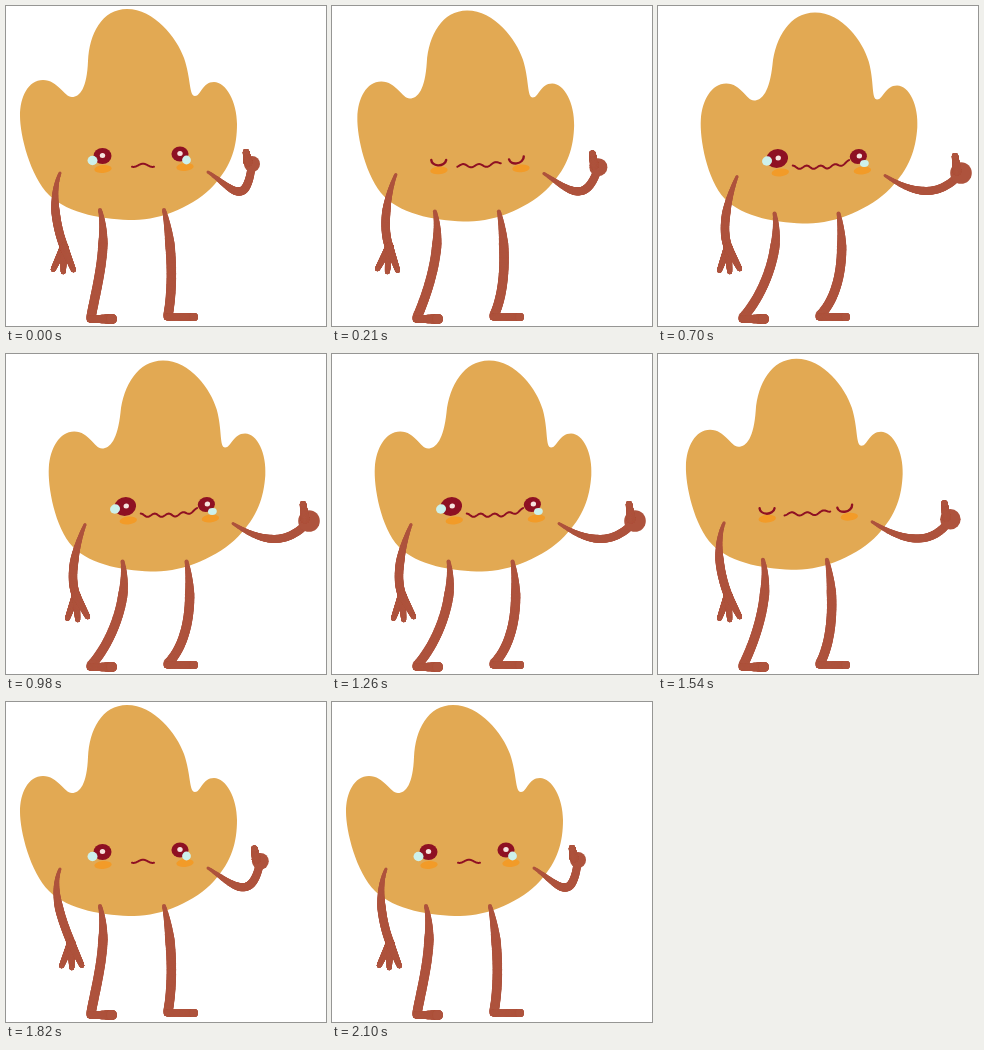
An HTML page with a canvas for the animation above (2170 ms loop, 320 px wide and 320 px high).

```html
<!DOCTYPE html>
<html lang="en">
<head>
<meta charset="utf-8">
<title>Thumbs up</title>
<style>
html, body { margin: 0; width: 100%; height: 100%; overflow: hidden; background: #fff; }
canvas { display: block; width: 100vmin; height: 100vmin; }
</style>
</head>
<body>
<canvas id="stage" width="320" height="320"></canvas>
<script>
const ctx = document.getElementById('stage').getContext('2d');
const LOOP = 2170, STEP = 70;
const SKIN = '#e2a953', LIMB = '#ae533d', RED = '#8e1023', TEAR = '#cdf1ec', BLUSH = '#f29b28';

const BODY = new Path2D(`M121 3 C96 3 83 28 82 55 S74 91 66 91 S52 74 37 74 S14 91 14 110
  S24 170 43 189 S100 214 128 214 S190 199 208 179 S231 140 231 118 S220 76 208 76
  S195 90 189 90 S185 72 178 52 S148 3 121 3Z`);

// Leaning is a sideways shear: the top travels further than the bottom
const SHIFT = 36.2, SHEAR = 0.067, DROP = 3.5;

// Smooth rise from 0 to 1 between two times
function ramp(t, from, to) {
  const x = Math.max(0, Math.min(1, (t - from) / (to - from)));
  return x * x * (3 - 2 * x);
}
const within = (t, from, to) => t >= from && t < to;
const add = (p, x, y) => [p[0] + x, p[1] + y];
const leaned = (x, y, lean) => [x + lean * (SHIFT - SHEAR * y), y + lean * DROP];

function oval(x, y, rx, ry, color, turn = 0) {
  ctx.beginPath();
  ctx.ellipse(x, y, rx, ry, turn, 0, Math.PI * 2);
  ctx.fillStyle = color;
  ctx.fill();
}

function stroke(width, color) {
  ctx.lineWidth = width;
  ctx.strokeStyle = color;
  ctx.stroke();
}

// Bezier limb that is thin at its root and reaches full width at `grow`
function limb(a, b, c, d, thin, full, grow = 1) {
  const at = (u, k) => {
    const v = 1 - u;
    return v * v * v * a[k] + 3 * v * v * u * b[k] + 3 * v * u * u * c[k] + u * u * u * d[k];
  };
  for (let i = 0; i <= 90; i++) {
    const u = i / 90;
    const r = (thin + (full - thin) * Math.min(1, u / grow)) / 2;
    oval(at(u, 0), at(u, 1), r, r, LIMB);
  }
}
const finger = (a, b, from, to) => limb(a, a, b, b, from, to);

function drawLeg(hipX, ankle, footLength, toe, lean) {
  const hip = leaned(hipX, 204, lean);
  const knee = leaned(hipX + 9, 239, lean);
  const shin = leaned(ankle[0] + 5, 283, lean);
  limb(hip, knee, shin, ankle, 4, 9.5, 0.3);
  finger(add(ankle, -1, 1.5), add(ankle, footLength, 1.5), 6.5, toe);
}

function drawLeftArm(t, lean) {
  const swing = ramp(t, 150, 370) - ramp(t, 420, 620);
  const out = ramp(t, 420, 650) - ramp(t, 1600, 2100);
  const shoulder = leaned(54, 167, lean);
  const wrist = [58 + 12 * out - 4 * swing, 241];
  limb(shoulder, add(shoulder, -10, 24), add(wrist, -7, -18), wrist, 3, 8.5, 0.5);
  for (let i = -1; i <= 1; i++) {
    const angle = 0.42 * i + 0.1 * out - 0.25 * swing - 0.03;
    finger(wrist, add(wrist, 25 * Math.sin(angle), 25 * Math.cos(angle)), 8.5, 4.5);
  }
}

function drawRightArm(t, lean) {
  const reach = ramp(t, 0, 520) - ramp(t, 1380, 1960);
  const shoulder = leaned(202, 166, lean);
  const fist = [246 + 57 * reach, 158 + 9 * reach];
  const elbow = add(fist, -6 - 19 * reach, 47 - 18 * reach);
  const radius = 8 + 2.8 * reach;
  limb(shoulder, add(shoulder, 23, 15), elbow, fist, 3, 8, 0.5);
  oval(...fist, radius, radius, LIMB);
  finger(add(fist, -4, -2), add(fist, -6, -12 - 5 * reach), 9, 6);
}

// side is -1 for the left eye and 1 for the right one
function drawEye(side, t, lean) {
  const left = side < 0;
  const x = left ? 96.5 : 174, y = left ? 150 : 148;
  const turn = left ? 0 : -0.2;
  oval(x + (left ? 0.5 : 5), y + 13, 8.7, 3.9, BLUSH, -0.08);

  if (within(t, 140, 280) || within(t, 1400, 1680)) {
    ctx.beginPath();
    ctx.ellipse(x, y + 2, 7.5, 6, turn, 0.1, Math.PI - 0.1);
    stroke(2.4, RED);
    return;
  }
  const size = left ? 1 + 0.2 * lean : 0.95;
  const ex = x - (left ? 3.5 * lean : 0);
  const shimmer = 0.4 * Math.sin(t / STEP * Math.PI / 2);
  oval(ex, y - lean, 9 * size, 8 * size, RED);
  oval(ex + lean + shimmer, y - 0.5 - lean, 2.7, 2.5, '#f6e3df');
  oval(ex + side * (left ? 10 : 6.5), y + (left ? 4.5 - 3 * lean : 6) + shimmer,
    left ? 5 : 4.4, left ? 4.7 : 4.4 - lean, TEAR);
}

// A single bump that stretches into a trembling line, rising on the right
function drawMouth(lean) {
  const open = Math.sqrt(Math.max(0, lean));
  const half = 11 + 17 * open, period = 19 - 5 * open;
  ctx.beginPath();
  for (let s = -1; s <= 1.001; s += 0.025) {
    const wave = 1.6 * Math.cos(2 * Math.PI * s * half / period);
    const rise = 5.5 * open * Math.max(0, s) ** 2;
    ctx.lineTo(137 + s * half, 159.3 - 1.6 * open - wave - rise);
  }
  stroke(2, RED);
}

function draw(t) {
  const lean = ramp(t, 0, 490) - ramp(t, 1310, 1760);
  ctx.fillStyle = '#fff';
  ctx.fillRect(0, 0, 320, 320);

  ctx.save();
  ctx.transform(1, 0, -SHEAR * lean, 1, SHIFT * lean, DROP * lean);
  ctx.fillStyle = SKIN;
  ctx.fill(BODY);
  drawEye(-1, t, lean);
  drawEye(1, t, lean);
  drawMouth(lean);
  ctx.restore();

  drawLeg(94, [85, 311.5], 21, 10, lean);
  drawLeg(158, [162, 309.5], 26, 8, lean);
  drawLeftArm(t, lean);
  drawRightArm(t, lean);
}

ctx.lineCap = ctx.lineJoin = 'round';
const start = performance.now();
function tick() {
  const t = Math.max(0, performance.now() - start) % LOOP;
  draw(Math.floor(t / STEP) * STEP);
  requestAnimationFrame(tick);
}
tick();
</script>
</body>
</html>
```
